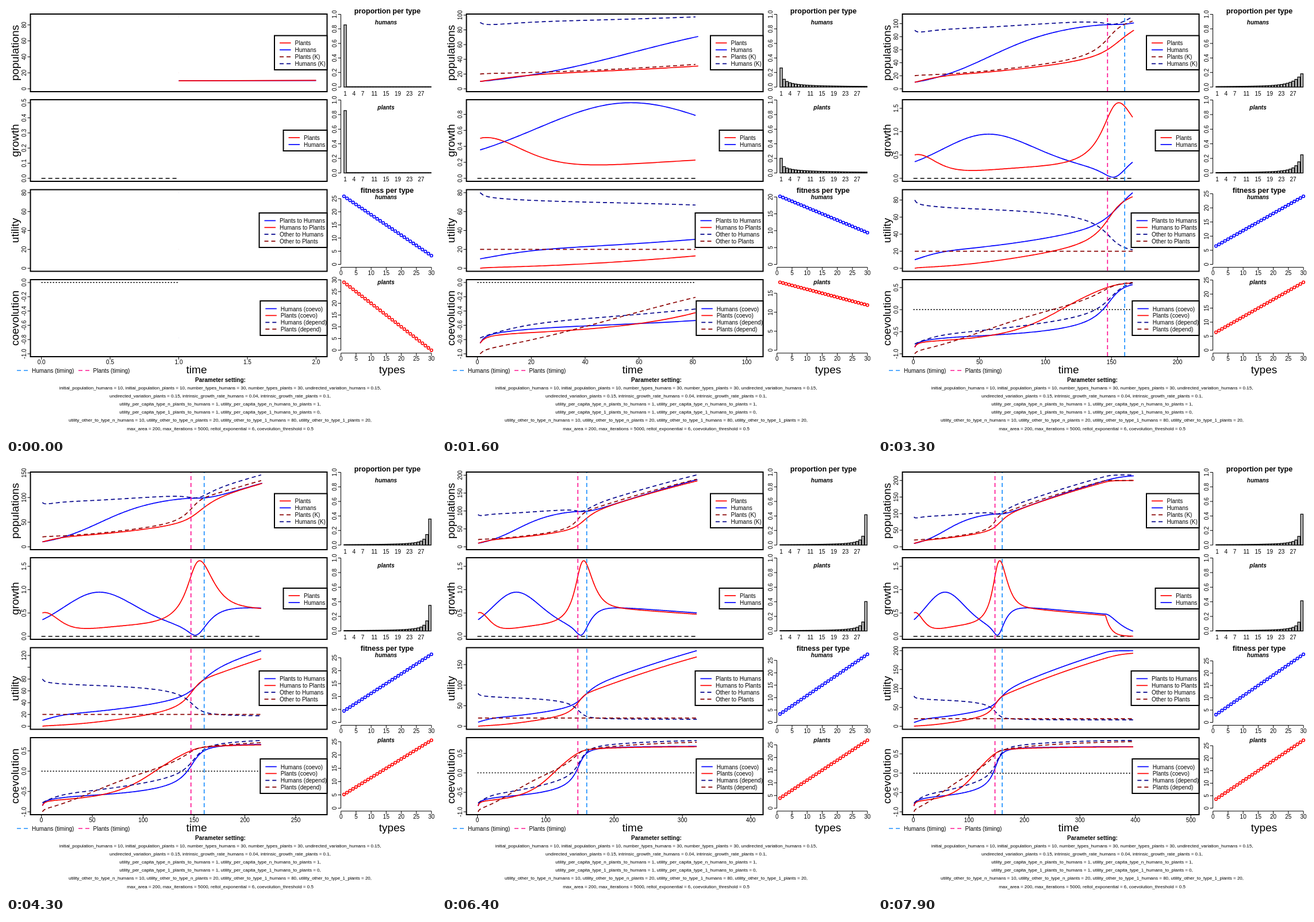
An HTML page with a canvas that plays this animation: 748 px wide and 748 px high, repeating every 8000 ms.

```html
<!DOCTYPE html>
<html lang="en">
<head>
<meta charset="utf-8">
<title>Coevolution of humans and plants</title>
<style>
html, body { margin: 0; width: 100%; height: 100%; overflow: hidden; background: #fff; }
canvas { display: block; }
</style>
</head>
<body>
<canvas id="stage" width="748" height="748"></canvas>
<script>
const g = document.getElementById('stage').getContext('2d');
const N = 30, LAST = 396, FRAME = 100, FRAMES = 80;
const RED = '#f00', BLUE = '#00f', DARKRED = '#8b0000', DARKBLUE = '#00008b';
const PINK = '#ff1493', SKY = '#1e90ff';
const DASH = [7, 5], DOT = [2, 3];
const PLANT_TIME = 147, HUMAN_TIME = 160;
const LEFT = 42.5, RIGHT = 558.5;
const types = Array.from({ length: N }, (_, i) => i + 1);

// ---- model: logistic growth plus selection among 30 types ----
const mean = q => q.reduce((s, v, i) => s + v * i / (N - 1), 0);
const vary = q => q.map(v => v * 0.85 + 0.15 / N);
const fitness = (own, other) =>
  types.map(i => (other * (N - i) + own * i) / (own + other));
function select(p, f) {
  const w = p.map((v, i) => v * f[i]);
  const sum = w.reduce((a, b) => a + b);
  return w.map(v => v / sum);
}
function simulate() {
  const out = [];
  const first = () => types.map(i => i === 1 ? 1 : 0);
  let H = 10, P = 10, qH = first(), qP = first();
  for (let t = 1; t <= LAST + 1; t++) {
    const level = mean(qH), uH = P, uP = H * level, oH = 80 - 70 * level, oP = 20;
    const kH = uH + oH, kP = Math.min(uP + oP, 200);
    const gH = 0.04 * H * (1 - H / kH), gP = 0.1 * P * (1 - P / kP);
    const pH = vary(qH), pP = vary(qP);
    const fH = fitness(uH, oH), fP = fitness(uP, oP);
    out.push({
      H, P, kH, kP, gH, gP, uH, uP, oH, oP, pH, pP, fH, fP,
      cH: 2 * mean(pH) - 1, cP: 2 * mean(pP) - 1,
      dH: (uH - oH) / (uH + oH), dP: (uP - oP) / (uP + oP)
    });
    H += gH; P += gP;
    qH = select(pH, fH); qP = select(pP, fP);
  }
  return out;
}
const run = simulate();

// ---- drawing helpers ----
function line(pts, color = '#000', width = 1, dash = []) {
  g.strokeStyle = color; g.lineWidth = width; g.setLineDash(dash);
  g.beginPath();
  pts.forEach(([x, y]) => g.lineTo(x, y));
  g.stroke();
  g.setLineDash([]);
}
function text(s, x, y, size = 10, align = 'center', style = '') {
  g.font = `${style} ${size}px "Liberation Sans", Arial, sans-serif`;
  g.textAlign = align; g.fillStyle = '#000';
  g.fillText(s, x, y);
}
function upText(s, x, y, size = 10) {
  g.save();
  g.translate(x, y); g.rotate(-Math.PI / 2);
  text(s, 0, 0, size);
  g.restore();
}
function frameBox(x, y, r, b) {
  g.fillStyle = '#fff'; g.fillRect(x, y, r - x, b - y);
  g.strokeStyle = '#000'; g.lineWidth = 2; g.strokeRect(x, y, r - x, b - y);
}

// round tick values for a range widened by 4 % at both ends
function pretty(lo, hi) {
  const pad = (hi - lo) * 0.04, cell = (hi - lo + 2 * pad) / 5;
  const base = 10 ** Math.floor(Math.log10(cell));
  let unit = base;
  if (2 * base - cell < 0.8 * (cell - unit)) {
    unit = 2 * base;
    if (5 * base - cell < 1.7 * (cell - unit)) {
      unit = 5 * base;
      if (10 * base - cell < 0.8 * (cell - unit)) unit = 10 * base;
    }
  }
  const ticks = [];
  for (let i = Math.ceil((lo - pad) / unit - 1e-9); i * unit <= hi + pad + 1e-9; i++) ticks.push(i * unit);
  ticks.digits = unit < 0.99 ? 1 : 0;
  return ticks;
}
// labels that would crowd the previous one are left out
function labels(ticks, place, at, upright) {
  let end = -Infinity;
  g.font = '10px "Liberation Sans", Arial, sans-serif';
  for (const v of ticks) {
    const s = v.toFixed(ticks.digits || 0), pos = place(v), along = upright ? -pos : pos;
    const half = g.measureText(s).width / 2;
    if (along - half - end < 7.5) continue;
    end = along + half;
    if (upright) upText(s, at + 3.6, pos); else text(s, pos, at + 3.6);
  }
}
function yAxis(ticks, y, x, gap) {
  line([[x, y(ticks[0])], [x, y(ticks[ticks.length - 1])]]);
  ticks.forEach(v => line([[x - 5, y(v)], [x, y(v)]]));
  labels(ticks, y, x - gap, true);
}
function xAxis(ticks, x, y) {
  line([[x(ticks[0]), y], [x(ticks[ticks.length - 1]), y]]);
  ticks.forEach(v => line([[x(v), y], [x(v), y + 5]]));
  labels(ticks, x, y + 9.8, false);
}
function legend(x, y, b, rowY, step, rows) {
  frameBox(x, y, RIGHT, b);
  rows.forEach(([name, color, dash], i) => {
    const cy = rowY + i * step;
    line([[x + 9, cy], [x + 28.5, cy]], color, 1.7, dash);
    text(name, x + 35.5, cy + 4, 10, 'left');
  });
}

// ---- left column ----
const panels = [
  { name: 'populations', top: 14, bottom: 149, lo: 0,
    series: [['H', BLUE], ['P', RED], ['kP', DARKRED, DASH], ['kH', DARKBLUE, DASH]],
    legend: [467, 51.5, 111, 64.3, 12, [['Plants', RED], ['Humans', BLUE],
      ['Plants (K)', DARKRED, DASH], ['Humans (K)', DARKBLUE, DASH]]] },
  { name: 'growth', top: 163, bottom: 305, lo: 0, zero: DASH,
    series: [['gH', BLUE], ['gP', RED]],
    legend: [482.5, 216, 252, 229, 12, [['Plants', RED], ['Humans', BLUE]]] },
  { name: 'utility', top: 319.5, bottom: 461.5, lo: 0,
    series: [['uH', BLUE], ['uP', RED], ['oH', DARKBLUE, DASH], ['oP', DARKRED, DASH]],
    legend: [440.5, 360, 420, 373.4, 11.9, [['Plants to Humans', BLUE], ['Humans to Plants', RED],
      ['Other to Humans', DARKBLUE, DASH], ['Other to Plants', DARKRED, DASH]]] },
  { name: 'coevolution', top: 476, bottom: 610, lo: -1, zero: DOT,
    series: [['cH', BLUE], ['cP', RED], ['dH', DARKBLUE, DASH], ['dP', DARKRED, DASH]],
    legend: [442.3, 513, 573, 526.5, 11.9, [['Humans (coevo)', BLUE], ['Plants (coevo)', RED],
      ['Humans (depend)', DARKBLUE, DASH], ['Plants (depend)', DARKRED, DASH]]] }
];
function drawPanel(p, T, x) {
  const count = key => key === 'H' || key === 'P' ? T + 1 : T;
  const values = p.series.map(([key]) => run.slice(0, count(key)).map(r => r[key]));
  const hi = Math.max(0, ...values.flat());
  const h = p.bottom - p.top, pad = h * 0.04 / 1.08;
  const y = v => p.bottom - pad - (v - p.lo) / (hi - p.lo) * (h - 2 * pad);

  frameBox(LEFT, p.top, RIGHT, p.bottom);
  yAxis(pretty(p.lo, hi), y, LEFT, 11.5);
  upText(p.name, 22, (p.top + p.bottom) / 2, 19);
  if (p.zero) line([[x(0), y(0)], [x(T), y(0)]], '#000', 1.7, p.zero);
  p.series.forEach(([, color, dash], i) =>
    line(values[i].map((v, j) => [x(j + 1), y(v)]), color, 1.7, dash));
  for (const [t, color] of [[PLANT_TIME, PINK], [HUMAN_TIME, SKY]])
    if (T >= t) line([[x(t), p.bottom - 1], [x(t), p.top + 1]], color, 1.7, DASH);
  legend(...p.legend);
}

// ---- right column ----
const barX = i => 590 + (i - 1) * 5.08;
const dotX = i => 582.7 + i * 5.245;
const tenths = [0, 0.2, 0.4, 0.6, 0.8, 1];
tenths.digits = 1;
const fives = [0, 5, 10, 15, 20, 25, 30];

function drawBars(p, name, nameY, top, zero) {
  const y = v => zero - v * (zero - top);
  yAxis(tenths, y, 582.5, 11);
  g.fillStyle = '#c4c4c4'; g.strokeStyle = '#000'; g.lineWidth = 1.3;
  p.forEach((v, i) => {
    const box = [barX(i + 1) - 2.1, y(v), 4.23, zero - y(v)];
    g.fillRect(...box); g.strokeRect(...box);
  });
  labels(types, barX, zero + 11, false);
  text(name, 661, nameY, 10, 'center', 'italic bold');
}
function drawFitness(f, name, nameY, top, zero, color) {
  const vals = f.map(v => v), hi = Math.max(...vals);
  const y = v => zero - v / hi * (zero - top);
  yAxis(pretty(0, hi), y, 582.5, 11);
  xAxis(fives, dotX, zero + 5);
  g.strokeStyle = color; g.lineWidth = 1.6;
  vals.forEach((v, i) => {
    g.beginPath(); g.arc(dotX(i + 1), y(v), 2.3, 0, 7); g.stroke();
  });
  text(name, 661, nameY, 10, 'center', 'italic bold');
}

// ---- captions ----
const settings = [
  'initial_population_humans = 10, initial_population_plants = 10, number_types_humans = 30, number_types_plants = 30, undirected_variation_humans = 0.15,',
  'undirected_variation_plants = 0.15, intrinsic_growth_rate_humans = 0.04, intrinsic_growth_rate_plants = 0.1,',
  'utility_per_capita_type_n_plants_to_humans = 1, utility_per_capita_type_n_humans_to_plants = 1,',
  'utility_per_capita_type_1_plants_to_humans = 1, utility_per_capita_type_1_humans_to_plants = 0,',
  'utility_other_to_type_n_humans = 10, utility_other_to_type_n_plants = 20, utility_other_to_type_1_humans = 80, utility_other_to_type_1_plants = 20,',
  'max_area = 200, max_iterations = 5000, reltol_exponential = 6, coevolution_threshold = 0.5'
];
function drawCaptions() {
  text('proportion per type', 663.5, 12.5, 12.5, 'center', 'bold');
  text('fitness per type', 663, 325, 12.5, 'center', 'bold');
  text('time', 331.5, 638.5, 19);
  text('types', 671.5, 638.5, 19);
  line([[19, 634], [39, 634]], SKY, 1.7, DASH);
  text('Humans (timing)', 45, 638, 10, 'left');
  line([[126, 634], [146, 634]], PINK, 1.7, DASH);
  text('Plants (timing)', 151.5, 638, 10, 'left');
  text('Parameter setting:', 373, 654, 10, 'center', 'bold');
  settings.forEach((s, i) => text(s, 372.5, 667 + i * 14.1, 8));
}

function draw(now) {
  const T = 5 * (Math.floor(now / FRAME) % FRAMES) + 1, r = run[T - 1];
  const span = Math.ceil(1.25 * T), pad = (RIGHT - LEFT) * 0.04 / 1.08;
  const x = t => LEFT + pad + t / span * (RIGHT - LEFT - 2 * pad);
  g.fillStyle = '#fff'; g.fillRect(0, 0, 748, 748);
  panels.forEach(p => drawPanel(p, T, x));
  xAxis(pretty(0, span), x, 610);
  drawBars(r.pH, 'humans', 31.5, 14.5, 141);
  drawBars(r.pP, 'plants', 180, 163.5, 290.5);
  drawFitness(r.fH, 'humans', 335.5, 331, 449.5, BLUE);
  drawFitness(r.fP, 'plants', 484, 480.5, 598.8, RED);
  drawCaptions();
}
let start;
function tick(now) {
  start ??= now;
  draw(now - start);
  requestAnimationFrame(tick);
}
requestAnimationFrame(tick);
</script>
</body>
</html>
```
